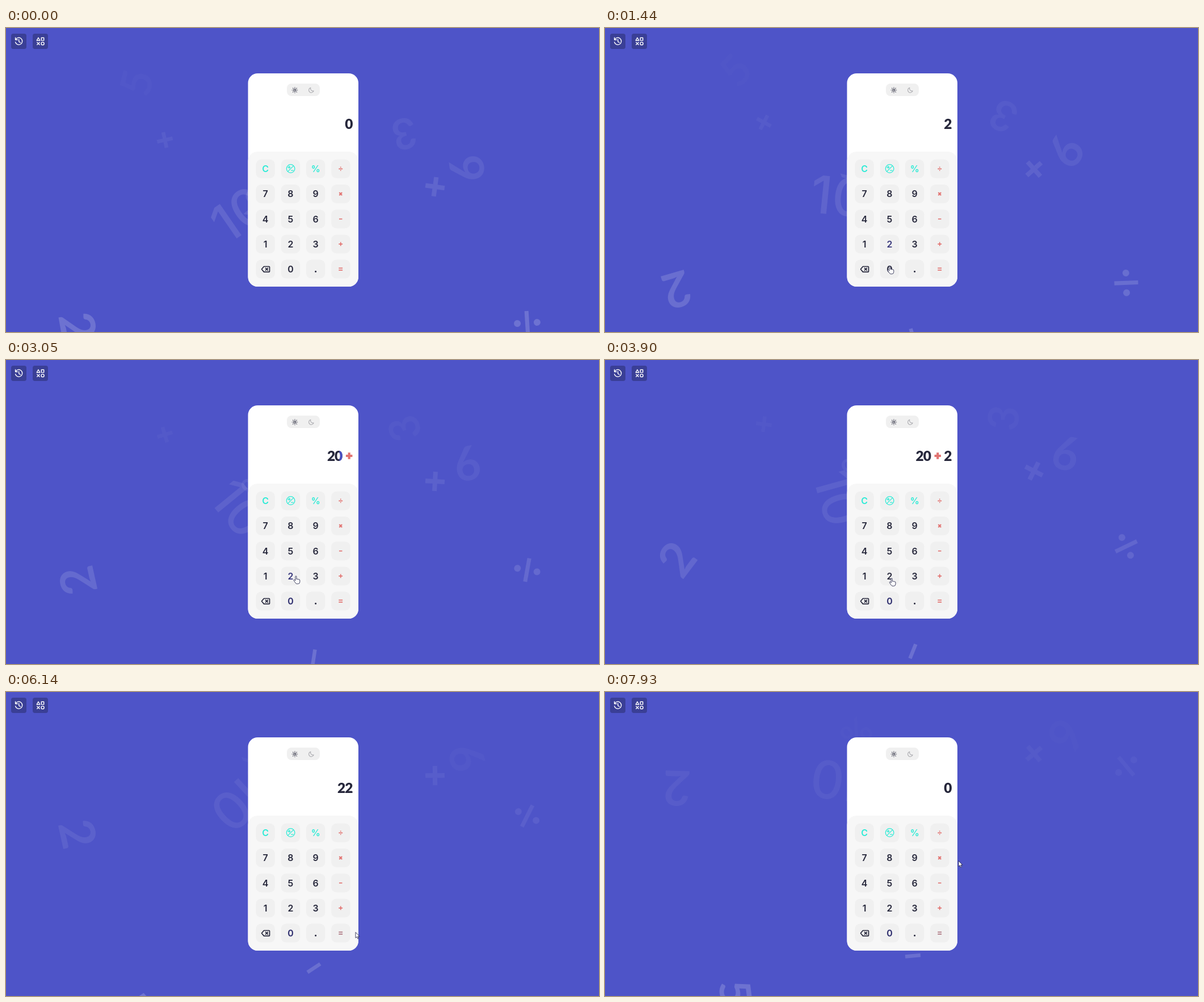
Animation of 1045 by 536 pixels, one loop 8 s. Source, as an HTML page with a canvas:

```html
<!DOCTYPE html>
<html lang="en">
<head>
<meta charset="utf-8">
<title>Calculator</title>
<style>
html, body { margin: 0; overflow: hidden; background: #4e54c8; }
canvas { display: block; }
</style>
</head>
<body>
<canvas width="1045" height="536"></canvas>
<script>
const ctx = document.querySelector('canvas').getContext('2d');
const LOOP = 8000, RISE = 556;
const INK = '#26273b', TEAL = '#2debd6', CORAL = '#e27472', INDIGO = '#4a50c4';

// Rising symbols: x, y at the start of the rise, size, seconds per rise, progress at time 0
const floaters = [
  { s: '10', x: 411, y: 579, size: 92, dur: 25.75, p: .452, font: 'Inter', weight: 500 },
  { s: '2', x: 126.5, y: 588, size: 85, dur: 12.36, p: .111 },
  { s: '3', x: 702, y: 594, size: 75, dur: 25.75, p: .733 },
  { s: '9', x: 812, y: 590, size: 83, dur: 25.75, p: .615 },
  { s: '5', x: 230, y: 594, size: 76, dur: 36.05, p: .895 },
  { s: '%', x: 443, y: 597, size: 62, dur: 18.54, p: .516 },
  { s: '+', x: 280, y: 605, size: 28, dur: 25.75, p: .733 },
  { s: '+', x: 756, y: 564, size: 34, dur: 25.75, p: .511 },
  { s: '-', x: 542.5, y: 600, size: 27, dur: 46.35, p: .0712 },
  { s: '÷', x: 918.5, y: 586.7, size: 42, dur: 11.33, p: .12 },
];

const keys = ['C', '±', '%', '÷', '7', '8', '9', '×', '4', '5', '6', '-',
  '1', '2', '3', '+', '⌫', '0', '.', '='].map((s, i) => ({
  s, x: 457.2 + i % 4 * 44.25, y: 248.3 + Math.floor(i / 4) * 44.2,
  color: i < 3 ? TEAL : i % 4 == 3 ? CORAL : INK,
}));

// Tints that linger on pressed keys: label, from, to, colour
const tints = [['2', 1000, 3700, '#38377c'], ['0', 1750, LOOP, '#2b2b6c'], ['=', 5450, LOOP, '#ad7580']];

const readings = [[0, '0'], [1090, '2'], [1850, '20'], [2650, '20 +'], [3470, '20 + 2'], [5450, '22'], [7080, '0']];

// Pointer tip: time, x, y
const route = [[0, 985, 575], [130, 975, 538], [820, 506, 376], [1120, 502, 378], [1420, 502, 420],
  [1830, 502, 421], [2140, 599, 373], [2650, 594, 376], [3050, 511, 381], [3500, 504, 380],
  [4200, 506, 388], [4810, 574, 424], [5050, 588, 424], [5500, 592, 424], [6140, 616, 424],
  [6750, 470, 262], [7100, 459, 258], [7400, 470, 262], [7930, 623, 298], [LOOP, 625, 299]];

const iconStroke = {
  history: new Path2D('M17 20.5A6.2 6.2 0 1 1 16.6 25M16.6 17v3.8h3.8M22.7 20.2v3.8l2.6 1.6'),
  shapes: new Path2D('M57 17l2.8 5h-5.6zM62.3 17.3h4.4v4.6h-4.4zM54.8 25.2l4.4 4.4m0-4.4l-4.4 4.4M67.1 27.4a2.5 2.5 0 1 1-5 0a2.5 2.5 0 1 1 5 0z'),
  sun: new Path2D('M4.2 0h.4M-4.2 0h-.4M0 4.2v.4M0-4.2v-.4M3 3l.3.3M-3-3l-.3-.3M3-3l.3-.3M-3 3l-.3.3M1.9 0a1.9 1.9 0 1 1-3.8 0a1.9 1.9 0 1 1 3.8 0z'),
  moon: new Path2D('M-1.2-4.2A4.4 4.4 0 1 0 4.2 1.4A4.4 4.4 0 0 1-1.2-4.2z'),
  sign: new Path2D('M7.3 0a7.3 7.3 0 1 1-14.6 0a7.3 7.3 0 1 1 14.6 0zM4.9-4.9l-9.8 9.8M-4.6-2.5h4M-2.6-4.5v4M1 3.2h3.6'),
  erase: new Path2D('M-3-4.8h9a1 1 0 0 1 1 1v7.6a1 1 0 0 1-1 1h-9l-4-4.8zM0-1.9l3.8 3.8m0-3.8l-3.8 3.8'),
};
const arrow = new Path2D('M0 0v9.6l2.2-2 1.7 3.6 1.6-.8-1.7-3.4h3z');
const hand = new Path2D('M-1.2 1.2q0-1.3 1.1-1.3t1.1 1.3v4.2q1.2-.7 2 .2q1.2-.5 1.9.4q1.9-.4 1.9 1.3v3q0 3.4-3.4 3.4h-1.6q-1.8 0-2.8-1.9l-2.8-4q-.4-1.5 1-1.5l1.6 1.4z');

function box(x, y, w, h, r, color) {
  ctx.fillStyle = color;
  ctx.beginPath();
  ctx.roundRect(x, y, w, h, r);
  ctx.fill();
}

function icon(path, x, y, color, width) {
  ctx.save();
  ctx.translate(x, y);
  ctx.strokeStyle = color;
  ctx.lineWidth = width;
  ctx.lineCap = ctx.lineJoin = 'round';
  ctx.stroke(path);
  ctx.restore();
}

// Operator built from bars and dots, centred on the origin
function operator(s, len, thick) {
  const bar = y => ctx.rect(-len / 2, y - thick / 2, len, thick);
  ctx.beginPath();
  if (s == '=') { bar(-thick); bar(thick); }
  else bar(0);
  if (s == '+' || s == '×') {
    const arm = (len - thick) / 2;
    ctx.rect(-thick / 2, -len / 2, thick, arm);
    ctx.rect(-thick / 2, thick / 2, thick, arm);
  }
  if (s == '÷') for (const y of [-.415 * len, .415 * len]) {
    ctx.moveTo(len / 7, y);
    ctx.arc(0, y, len / 7, 0, 7);
  }
  ctx.fill();
}

function floater({ s, x, y, size, dur, p, font = 'Lato', weight = 700 }, t) {
  p = (p + t / 1000 / dur) % 1;
  ctx.save();
  ctx.translate(x, y - RISE * p);
  ctx.rotate(p * 4 * Math.PI);
  ctx.fillStyle = `rgba(255,255,255,${.2 * (1 - p)})`;
  if ('+-÷'.includes(s)) operator(s, size, size * (s == '÷' ? .17 : .24));
  else {
    ctx.font = `${weight} ${size}px ${font}, sans-serif`;
    ctx.textAlign = 'center';
    ctx.fillText(s, 0, size * .36);
  }
  ctx.restore();
}

function key({ s, x, y, color }, t) {
  box(x - 16.7, y - 16.5, 33.4, 33, 9, '#f0f0f0');
  const tint = tints.find(([label, from, to]) => label == s && t >= from && t < to);
  if (tint) color = tint[3];
  if (s == '±') return icon(iconStroke.sign, x + .2, y - .3, color, 1.3);
  if (s == '⌫') return icon(iconStroke.erase, x + .3, y + .2, color, 1.7);
  ctx.fillStyle = color;
  if ('÷×-+='.includes(s)) {
    ctx.save();
    ctx.translate(x - .2, y);
    if (s == '×') ctx.rotate(Math.PI / 4);
    operator(s, s == '-' ? 5.5 : 6.8, s == '×' ? 2.1 : 1.7);
    ctx.restore();
    return;
  }
  ctx.font = `600 ${s == '.' ? 20 : 16}px Inter, sans-serif`;
  ctx.textAlign = 'center';
  ctx.fillText(s, x, y + 5.9);
}

function writeReading(text, color) {
  let x = 611.5;
  ctx.font = '900 24.5px Lato, sans-serif';
  ctx.textAlign = 'right';
  for (const c of [...text].reverse()) {
    ctx.fillStyle = color;
    if (c == '+') {
      ctx.save();
      ctx.translate(x - 6.8, 169);
      ctx.fillStyle = CORAL;
      operator('+', 11.5, 4.2);
      ctx.restore();
      x -= 13;
    } else if (c == ' ') x -= 5.2;
    else {
      ctx.fillText(c, x, 177.5);
      x -= 13.2;
    }
  }
}

function display(t) {
  const [since, text] = readings.findLast(r => t >= r[0]);
  writeReading(text, INK);
  // Part of the fresh number stays indigo for a moment
  const glow = text == '20' && t - since < 420 ? [580, 24] : text == '20 +' ? [587.5, 6] : null;
  if (!glow) return;
  ctx.save();
  ctx.beginPath();
  ctx.rect(glow[0], 155, glow[1], 28);
  ctx.clip();
  writeReading(text.slice(0, 2) + text.slice(2), INDIGO);
  ctx.restore();
}

function pointer(t) {
  const i = Math.max(1, route.findIndex(r => r[0] > t));
  const [t0, x0, y0] = route[i - 1], [t1, x1, y1] = route[i];
  const u = (t - t0) / (t1 - t0), k = u * u * (3 - 2 * u);
  const x = x0 + (x1 - x0) * k, y = y0 + (y1 - y0) * k;
  const over = keys.some(b => Math.abs(x - b.x) < 17 && Math.abs(y - b.y) < 17);
  const shape = over ? hand : arrow;
  ctx.save();
  ctx.translate(x, y);
  ctx.fillStyle = '#fff';
  ctx.fill(shape);
  ctx.restore();
  icon(shape, x, y, '#2b2c50', .9);
}

function draw(t) {
  ctx.fillStyle = '#4e54c8';
  ctx.fillRect(0, 0, 1045, 536);
  floaters.forEach(f => floater(f, t));

  box(9, 10, 27, 27, 4, '#3a3f96');
  box(47, 10, 27, 27, 4, '#3a3f96');
  icon(iconStroke.history, 0, 0, '#fff', 1.4);
  icon(iconStroke.shapes, 0, 0, '#fff', 1.4);

  box(426.5, 80, 194.5, 376, 17, '#fff');
  box(426.5, 218, 194.5, 238, 17, '#f7f7f7');
  box(495, 98, 58, 22, 8, '#f0f0f0');
  icon(iconStroke.sun, 509, 109.5, INK, 1.2);
  icon(iconStroke.moon, 538, 109.5, '#a9a9ad', 1.1);

  display(t);
  keys.forEach(k => key(k, t));
  pointer(t);
}

let start;
function frame(now) {
  start ??= now;
  draw((now - start) % LOOP);
  requestAnimationFrame(frame);
}
requestAnimationFrame(frame);
</script>
</body>
</html>
```
